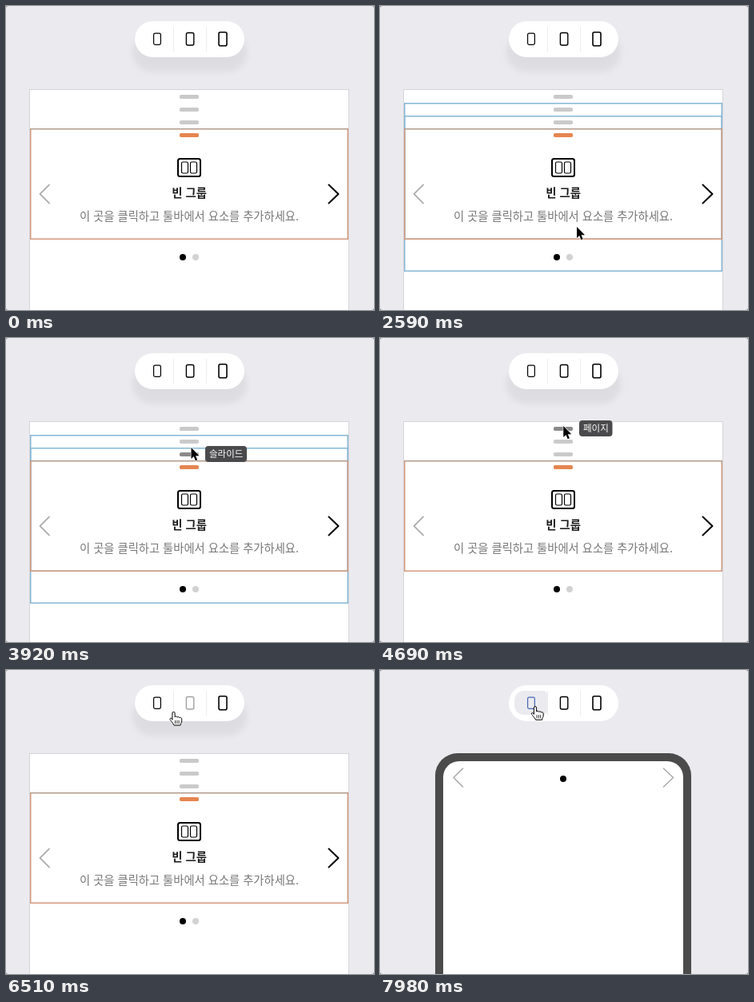
Write an HTML page that moves like this. It is 460 px wide and 380 px high and loops after 8000 ms.

```html
<!DOCTYPE html>
<html lang="ko">
<head>
<meta charset="utf-8">
<title>Responsive preview</title>
<style>
  html, body { margin: 0; width: 100%; height: 100%; overflow: hidden; background: #85858a; }
  #stage { display: block; width: 460px; height: 380px; border-radius: 3px; background: #ebeaef; }
  text { font-family: "Noto Sans CJK KR", "Noto Sans CJK", sans-serif; }
  .line { fill: none; stroke-linejoin: round; stroke-linecap: round; }
  .blue { fill: none; stroke: #86b8d6; stroke-width: 1.5; }
</style>
</head>
<body>
<svg id="stage" viewBox="0 0 460 380" width="460" height="380">
  <defs>
    <filter id="soft" x="-20%" y="-50%" width="140%" height="200%">
      <feGaussianBlur stdDeviation="4"/>
    </filter>
  </defs>

  <rect id="shadow" x="158" y="33" width="143" height="49" rx="24" fill="#000" opacity=".055" filter="url(#soft)"/>
  <rect x="161" y="19" width="137" height="45" rx="22.5" fill="#fff"/>
  <path d="M209.5 26V57M250.5 26V57" stroke="#ececf0"/>
  <path id="active" d="M180 26H204a5 5 0 0 1 5 5V51a5 5 0 0 1-5 5H180a12 12 0 0 1-12-12V38a12 12 0 0 1 12-12Z" fill="#ebeaef"/>
  <g class="line">
    <rect id="small" x="184.6" y="34.2" width="8.8" height="14.2" rx="1.8" stroke-width="1.2"/>
    <rect id="medium" x="225.4" y="33.5" width="9.4" height="15.5" rx="2" stroke-width="1.4"/>
    <rect x="266" y="32.8" width="10" height="17" rx="2" stroke="#000" stroke-width="1.6"/>
  </g>

  <g id="desktop">
    <rect x="29.5" y="104.5" width="399" height="290" fill="#fff" stroke="#d5d5d9"/>
    <rect id="slider" class="blue" x="30.75" y="121.75" width="396.5" height="209.5"/>
    <rect id="slide" class="blue" x="30.75" y="137.75" width="396.5" height="153.5"/>
    <rect x="30.75" y="153.75" width="396.5" height="137.5" fill="none" stroke="#d49a7d" stroke-width="1.5"/>
    <path d="M30 153.5H428" stroke="#ab9a90"/>
    <g id="handles"></g>
    <g class="line" stroke="#000">
      <rect x="215" y="191" width="28" height="22" rx="2.5" stroke-width="2"/>
      <rect x="219.5" y="195" width="8" height="14" rx="1.8" stroke-width="1.2"/>
      <rect x="230.5" y="195" width="8" height="14" rx="1.8" stroke-width="1.2"/>
      <path d="M54 223.5L42.5 235L54 246.5" stroke="#b0b0b0" stroke-width="1.8"/>
      <path d="M403.5 223.5L415.5 235L403.5 246.5" stroke-width="2"/>
    </g>
    <text x="229" y="238.7" font-size="14.4" font-weight="700" text-anchor="middle" fill="#1c1c1e">빈 그룹</text>
    <text x="229" y="268" font-size="14.3" text-anchor="middle" fill="#777">이 곳을 클릭하고 툴바에서 요소를 추가하세요.</text>
    <circle cx="221" cy="314" r="4"/>
    <circle cx="237" cy="314" r="4" fill="#d2d2d2"/>
    <g id="tip">
      <rect x="249" width="52" height="20" rx="4" fill="#4a4a4c"/>
      <text x="254" y="14.2" font-size="11.5" font-weight="500" fill="#fff"></text>
    </g>
  </g>

  <g id="phone">
    <path d="M69 380V132a28 28 0 0 1 28-28H361a28 28 0 0 1 28 28V380Z" fill="#4b4b4c"/>
    <path d="M79 380V134a20 20 0 0 1 20-20H359a20 20 0 0 1 20 20V380Z" fill="#fff"/>
    <path class="line" d="M103.5 123L92 134.5L103.5 146M354.5 123L366.5 134.5L354.5 146" stroke="#ababab" stroke-width="1.6"/>
    <circle cx="229" cy="136" r="4"/>
  </g>

  <g id="cursor">
    <path id="arrow" d="M0 0V14L3.2 11.1L5.4 16.3L7.7 15.3L5.5 10.2H10Z" fill="#000" stroke="#fff" stroke-width="1.2" stroke-linejoin="round" paint-order="stroke"/>
    <g id="hand" stroke="#000" stroke-linejoin="round" stroke-linecap="round">
      <path d="M-1.6 9V1.2a1.6 1.6 0 0 1 3.2 0V6c.5-1.1 2.6-1.1 3 .4c.6-1 2.5-.8 2.8.6c.7-.7 2.8-.3 2.8 1.6V11c0 2-1.6 3-1.6 5.3H.6C0 14.3-1.5 13.5-2.7 11.5C-3.7 10-5 9.2-4.5 8C-4 7-2.6 7.4-1.6 9Z" fill="#fff" stroke-width="1"/>
      <path d="M2 10.5V14M4.3 10.5V14M6.6 10.5V14" fill="none" stroke-width=".8"/>
    </g>
  </g>
</svg>
<script>
const $ = id => document.getElementById(id);
const LOOP = 8000, STEP = 70, SWITCH = 7350;

// time, x, y, ease-out power (1 is linear)
const path = [
  [770, 257, 382], [1260, 250, 341], [1540, 250, 341],
  [1610, 248.5, 331, 1], [2310, 247, 285], [2520, 247, 285],
  [2590, 246, 276, 1], [3360, 236, 156], [3430, 235, 154, 1],
  [3920, 231.5, 137], [3990, 231.5, 137], [4410, 230, 122],
  [4480, 230, 122], [4900, 229, 106], [5180, 229, 106],
  [5530, 226.5, 73, 1], [5950, 227, 58], [6300, 227, 58],
  [7140, 187, 46], [7700, 187, 46], [7980, 194, 46]
];

const handles = [
  { y: 113.5, label: '페이지' },
  { y: 129.5, label: '슬라이더' },
  { y: 145.5, label: '슬라이드' },
  { y: 161.5, label: '그룹', color: '#e5854f' }
];

for (const h of handles) {
  h.bar = document.createElementNS('http://www.w3.org/2000/svg', 'rect');
  const attrs = { x: 217, y: h.y - 2.5, width: 24, height: 5, rx: 1.8 };
  for (const k in attrs) h.bar.setAttribute(k, attrs[k]);
  $('handles').append(h.bar);
}

const show = (id, on) => { $(id).style.display = on ? '' : 'none'; };

function cursorAt(t) {
  const i = path.findIndex(p => p[0] >= t);
  if (i < 0) return path[path.length - 1].slice(1, 3);
  if (i === 0) return path[0].slice(1, 3);
  const [t0, x0, y0] = path[i - 1], [t1, x1, y1, pow = 2] = path[i];
  const p = 1 - (1 - (t - t0) / (t1 - t0)) ** pow;
  return [x0 + (x1 - x0) * p, y0 + (y1 - y0) * p];
}

function draw(t) {
  const [x, y] = cursorAt(t);
  const phone = t >= SWITCH;
  const onBar = y < 64;

  show('cursor', t >= 840);
  $('cursor').setAttribute('transform', `translate(${x} ${y})`);
  show('arrow', !onBar);
  show('hand', onBar);

  show('desktop', !phone);
  show('phone', phone);
  show('shadow', !phone);
  show('active', phone);
  $('small').setAttribute('stroke', phone ? '#4668b4' : onBar && x < 209 ? '#a2a2a2' : '#000');
  $('medium').setAttribute('stroke', onBar && x >= 209 ? '#a2a2a2' : '#000');

  show('slider', y < 330 && y > 121.9);
  show('slide', y < 292 && y > 136);

  const hit = handles.find(h => y > h.y - 13 && y <= h.y + 3);
  for (const h of handles) h.bar.setAttribute('fill', h.color || (h === hit ? '#8a8a8a' : '#cacaca'));
  show('tip', hit);
  if (hit) {
    const [box, text] = $('tip').children;
    $('tip').setAttribute('transform', `translate(0 ${hit.y - 10.5})`);
    box.setAttribute('width', 10 + 10.5 * hit.label.length);
    text.textContent = hit.label;
  }
}

const start = performance.now();
function tick() {
  const t = (performance.now() - start) % LOOP;
  draw(Math.floor(t / STEP) * STEP);
  requestAnimationFrame(tick);
}
tick();
</script>
</body>
</html>
```
